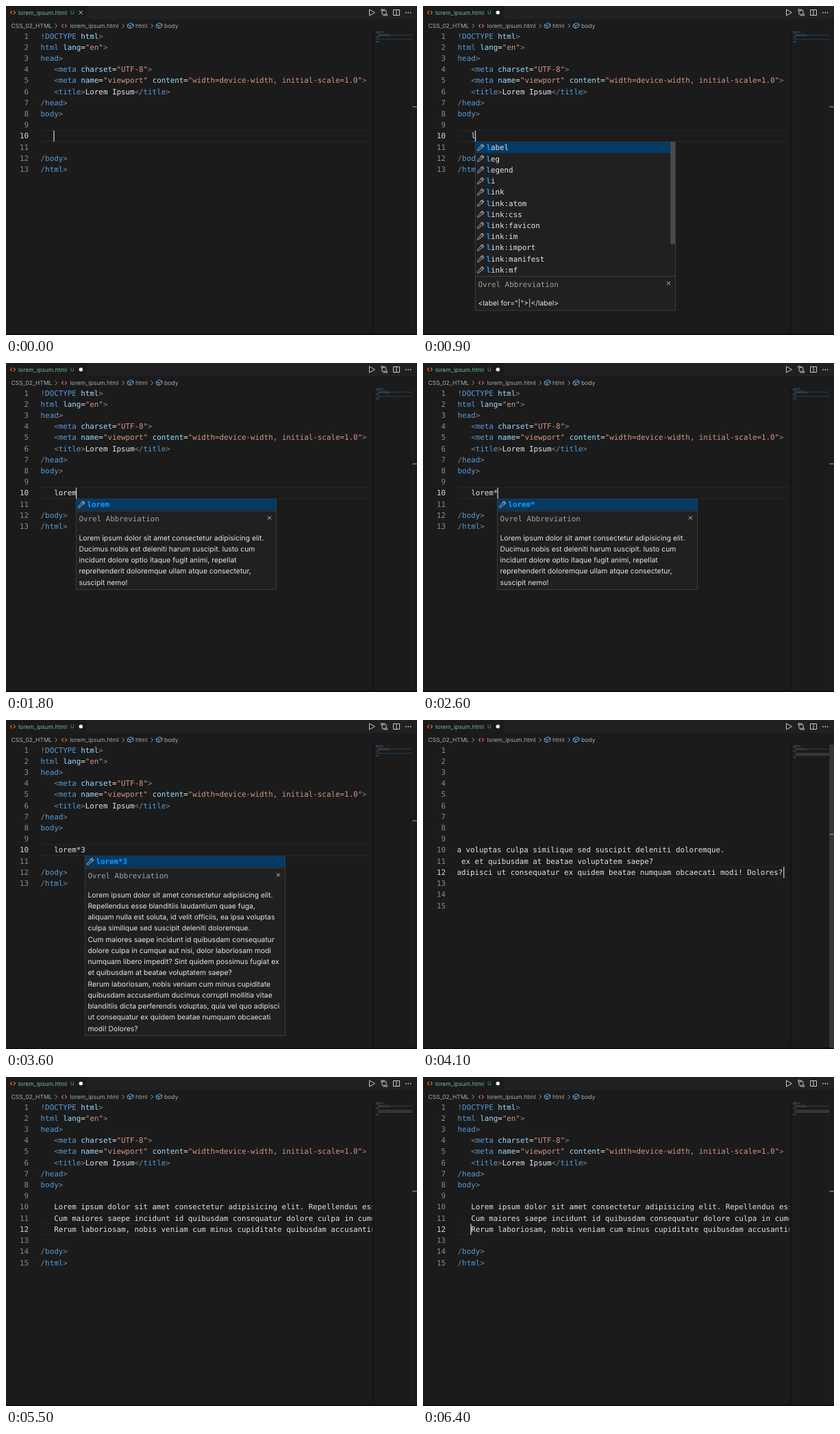
Recreate the animation shown at these times as an HTML page. Size 600 by 480 pixels, loop 6.5 s.

```html
<!DOCTYPE html>
<html lang="en">
<head>
<meta charset="UTF-8">
<title>Editor typing loop</title>
<style>
  html, body { margin: 0; width: 100%; height: 100%; overflow: hidden; background: #1b1b1c; }
  svg { display: block; width: 100%; height: 100%; }
  text { white-space: pre; text-rendering: geometricPrecision; }
  .mono { font: 10.84px "DejaVu Sans Mono", monospace; fill: #e4e4e4; }
  .ui { font: 8.55px Inter, sans-serif; fill: #a9a9a9; }
  .doc { font: 10.37px Inter, sans-serif; fill: #e6e6e6; }
  .num { text-anchor: end; fill: #8a8a8a; }
  .num.on { fill: #d8d8d8; }
  .punct { fill: #858585; }
  .tag { fill: #569cd6; }
  .attr { fill: #9cdcfe; }
  .str { fill: #d4977c; }
  .hit { fill: #189bff; font-weight: bold; }
  .line { fill: none; stroke: #c8c8c8; stroke-width: 1; }
</style>
</head>
<body>
<svg viewBox="0 0 600 480" xmlns="http://www.w3.org/2000/svg">
  <defs>
    <clipPath id="view"><rect x="50.3" y="36" width="486.7" height="442"/></clipPath>
    <path id="angles" d="M-1.2 -2.5L-3.6 0L-1.2 2.5M1.2 -2.5L3.6 0L1.2 2.5" fill="none" stroke="#d9682f" stroke-width="1.1"/>
    <path id="chevron" d="M-1.5 -3.2L1.6 0L-1.5 3.2" fill="none" stroke="#a0a0a0" stroke-width=".9"/>
    <path id="cube" d="M-4.2 -1.2L.8 -3.8L4.4 -2V1.6L-.6 4.2L-4.2 2.4ZM-4.2 -1.2L-.6 .6L4.4 -2M-.6 .6V4.2" fill="none" stroke="#6cb8f0" stroke-width=".9" stroke-linejoin="round"/>
    <path id="cross" d="M-2.5 -2.5L2.5 2.5M2.5 -2.5L-2.5 2.5" class="line"/>
    <path id="wrench" d="M-4.2 2.6L-.2 -1.2A3 3 0 0 1 3.4 -4.4L1.7 -2.6L2.6 -1.4L4.4 -3.1A3 3 0 0 1 1.2 .6L-2.6 4.3A1.1 1.1 0 0 1 -4.2 2.6Z" fill="none" stroke="#cfcfcf" stroke-width=".9" stroke-linejoin="round"/>
  </defs>
  <rect width="600" height="480" fill="#1b1b1c"/>
  <rect x="118" width="482" height="19" fill="#212123"/>

  <use href="#angles" x="10" y="9.5"/>
  <text class="ui" x="18" y="12.5" style="fill:#6cc18a">lorem_ipsum.html</text>
  <text class="ui" x="94" y="12.3" style="fill:#5ba376;font-size:7.6px">U</text>
  <g class="line">
    <path d="M530.5 5L538.5 9.5L530.5 14Z"/>
    <path d="M549 7.5V11.5Q549 13 551 13H553M551.5 11.3L553.2 13L551.5 14.7M555 11.5V7.5Q555 6 553 6H551M552.5 4.3L550.8 6L552.5 7.7"/>
    <circle cx="549" cy="6" r="1.4"/><circle cx="555.2" cy="13" r="1.4"/>
    <path d="M565.5 5.5H574.5V13.5H565.5ZM570 5.5V13.5"/>
  </g>
  <g fill="#c8c8c8"><circle cx="584" cy="9.7" r=".9"/><circle cx="587.3" cy="9.7" r=".9"/><circle cx="590.6" cy="9.7" r=".9"/></g>

  <g class="ui">
    <text x="7.5" y="32">CSS_02_HTML</text><use href="#chevron" x="73" y="29"/>
    <use href="#angles" x="85" y="29"/>
    <text x="93.5" y="32">lorem_ipsum.html</text><use href="#chevron" x="171" y="29"/>
    <use href="#cube" x="181.5" y="28.5"/>
    <text x="189" y="32">html</text><use href="#chevron" x="213" y="29"/>
    <use href="#cube" x="223.5" y="28.5"/>
    <text x="231" y="32">body</text>
  </g>
  <g id="editor"></g>
  <rect y="478" width="600" height="2" fill="#120b14"/>
</svg>
<script>
const LOOP = 6500, BLINK = 500;
const LEFT = 50.6, CHAR = 10.84 * .60205, BASE = 47.6, PITCH = 16.21;
const ENTER = 3900, HOME = 5000;
const editor = document.getElementById('editor');

const keys = [[600, 'l'], [1000, 'lo'], [1150, 'lor'], [1300, 'lore'], [1500, 'lorem'], [2400, 'lorem*'], [2700, 'lorem*3']];

const head = ['<!DOCTYPE html>', '<html lang="en">', '<head>', '    <meta charset="UTF-8">',
  '    <meta name="viewport" content="width=device-width, initial-scale=1.0">',
  '    <title>Lorem Ipsum</title>', '</head>', '<body>', ''];
const tail = ['', '</body>', '</html>'];

const shortDoc = ['Lorem ipsum dolor sit amet consectetur adipisicing elit.',
  'Ducimus nobis est deleniti harum suscipit. Iusto cum',
  'incidunt dolore optio itaque fugit animi, repellat',
  'reprehenderit doloremque ullam atque consectetur,', 'suscipit nemo!'];
const longDoc = ['Lorem ipsum dolor sit amet consectetur adipisicing elit.',
  'Repellendus esse blanditiis laudantium quae fuga,',
  'aliquam nulla est soluta, id velit officiis, ea ipsa voluptas',
  'culpa similique sed suscipit deleniti doloremque.',
  'Cum maiores saepe incidunt id quibusdam consequatur',
  'dolore culpa in cumque aut nisi, dolor laboriosam modi',
  'numquam libero impedit? Sint quidem possimus fugiat ex',
  'et quibusdam at beatae voluptatem saepe?',
  'Rerum laboriosam, nobis veniam cum minus cupiditate',
  'quibusdam accusantium ducimus corrupti mollitia vitae',
  'blanditiis dicta perferendis voluptas, quia vel quo adipisci',
  'ut consequatur ex quidem beatae numquam obcaecati', 'modi! Dolores?'];
const paragraphs = [[0, 4], [4, 8], [8, 13]].map(([a, b]) => '    ' + longDoc.slice(a, b).join(' '));
const suggestions = ['label', 'leg', 'legend', 'li', 'link', 'link:atom', 'link:css', 'link:favicon',
  'link:im', 'link:import', 'link:manifest', 'link:mf'];

const esc = s => s.replace(/&/g, '&amp;').replace(/</g, '&lt;').replace(/>/g, '&gt;');
const text = (x, y, cls, content) => `<text x="${x}" y="${y}" class="${cls}">${content}</text>`;
const rect = (x, y, w, h, fill, extra = '') => `<rect x="${x}" y="${y}" width="${w}" height="${h}" fill="${fill}" ${extra}/>`;
const use = (id, x, y) => `<use href="#${id}" x="${x}" y="${y}"/>`;

function colour(line) {
  const token = /(<[\/!]?|>)|("[^"]*")|((?<=<[\/!]?)\w+)|(\w+(?==)|(?<=DOCTYPE )\w+)|[^<>"\w]+|\w+/g;
  return line.replace(token, (s, punct, str, tag, attr) => {
    const cls = punct ? 'punct' : str ? 'str' : tag ? 'tag' : attr ? 'attr' : '';
    return cls ? `<tspan class="${cls}">${esc(s)}</tspan>` : esc(s);
  });
}

function popup(x, typed) {
  const single = typed.length > 1;
  const rows = single ? [typed] : suggestions;
  const doc = typed.length === 1 ? ['<label for="|">|</label>']
    : typed.length < 5 ? [`<${typed}>|</${typed}>`]
    : typed.endsWith('3') ? longDoc : shortDoc;
  const top = 198.3, step = 16.24, width = 292, divider = top + rows.length * step + 1.4;
  const bottom = divider + 49.5 + (doc.length - 1) * step;
  let out = rect(x, top, width, bottom - top, '#202022', 'stroke="#424242" stroke-width=".8"')
    + rect(x + .4, top, width - .8, step, '#043b65');
  rows.forEach((row, i) => {
    const y = top + (i + .5) * step, n = typed.length;
    out += use('wrench', x + 7.5, y)
      + text(x + 16, y + 3.9, 'mono', `<tspan class="hit">${esc(row.slice(0, n))}</tspan>${esc(row.slice(n))}`);
  });
  if (!single) out += rect(x + 284.7, top, 6.8, 149, '#4b4b4d');
  out += rect(x, divider - .4, width, .8, single ? '#424242' : '#4c4632')
    + text(x + 4, divider + 15.2, 'mono" style="fill:#a0a0a0', 'Ovrel Abbreviation')
    + use('cross', x + 282, divider + 10);
  doc.forEach((s, i) => out += text(x + 4, divider + 42.8 + i * step, 'doc', esc(s)));
  return out;
}

function minimap(lines, expanded) {
  let out = rect(534.5, 36, 2.5, 442, '#171718') + rect(537, 36, .6, 442, '#101011');
  if (!expanded) out += rect(540, 48.1, 53.5, 1, '#1b4056');
  lines.forEach((line, i) => {
    const indent = line.search(/\S/);
    if (indent < 0) return;
    const x = 540 + indent * .7, body = expanded && i > 8 && i < 12;
    out += rect(x, 36.8 + i * 1.29, Math.min((line.length - indent) * .7, 593 - x), .7, body ? '#565656' : '#38505f');
  });
  return out;
}

function draw(typed, expanded, scrolled, cursorOn) {
  const lines = [...head, ...(expanded ? paragraphs : ['    ' + typed]), ...tail];
  const active = expanded ? 11 : 9;
  const scroll = scrolled ? lines[active].length - 73 : 1;
  const column = expanded && !scrolled ? 4 : expanded ? lines[active].length : 4 + typed.length;
  const cursorX = LEFT + (column - scroll) * CHAR;
  const rowTop = 181.7 + (active - 9) * PITCH;

  let out = rect(50.5, rowTop - .4, 486, .9, '#282828') + rect(50.5, rowTop + 15.6, 486, .9, '#282828');
  let code = '';
  lines.forEach((line, i) => {
    const y = BASE + i * PITCH;
    out += text(33, y, 'mono num' + (i === active ? ' on' : ''), i + 1);
    const plain = i >= 9 && i <= active;
    code += text(LEFT - scroll * CHAR, y, 'mono', plain ? esc(line) : colour(line));
  });
  out += `<g clip-path="url(#view)">${code}</g>` + minimap(lines, expanded);
  out += rect(593, 36, .6, 442, '#29292a');
  if (scrolled) out += rect(593.3, 36, 6.7, 442, '#363637');
  out += rect(593.5, expanded ? 166 : 146.5, 6.5, 1.3, '#8b8b8b');
  if (cursorOn) out += rect(cursorX - .9, rowTop + .2, 1.3, 16, '#c6c6c6');
  out += typed || expanded ? '<circle cx="109.3" cy="9.5" r="2.7" fill="#fff"/>' : use('cross', 109.3, 9.5);
  if (typed && !expanded) out += popup(Math.round(cursorX) - .5, typed);
  editor.innerHTML = out;
}

let shown = '';
function frame() {
  const t = performance.now() % LOOP;
  const [pressed, typed] = keys.findLast(([at]) => at <= t) || [0, ''];
  const expanded = t >= ENTER, scrolled = expanded && t < HOME;
  const lastAction = t >= HOME ? HOME : expanded ? ENTER : pressed;
  const cursorOn = Math.floor((t - lastAction) / BLINK) % 2 === 0;
  const state = [typed, expanded, scrolled, cursorOn];
  if (shown !== state.join()) {
    shown = state.join();
    draw(...state);
  }
  requestAnimationFrame(frame);
}
frame();
</script>
</body>
</html>
```
